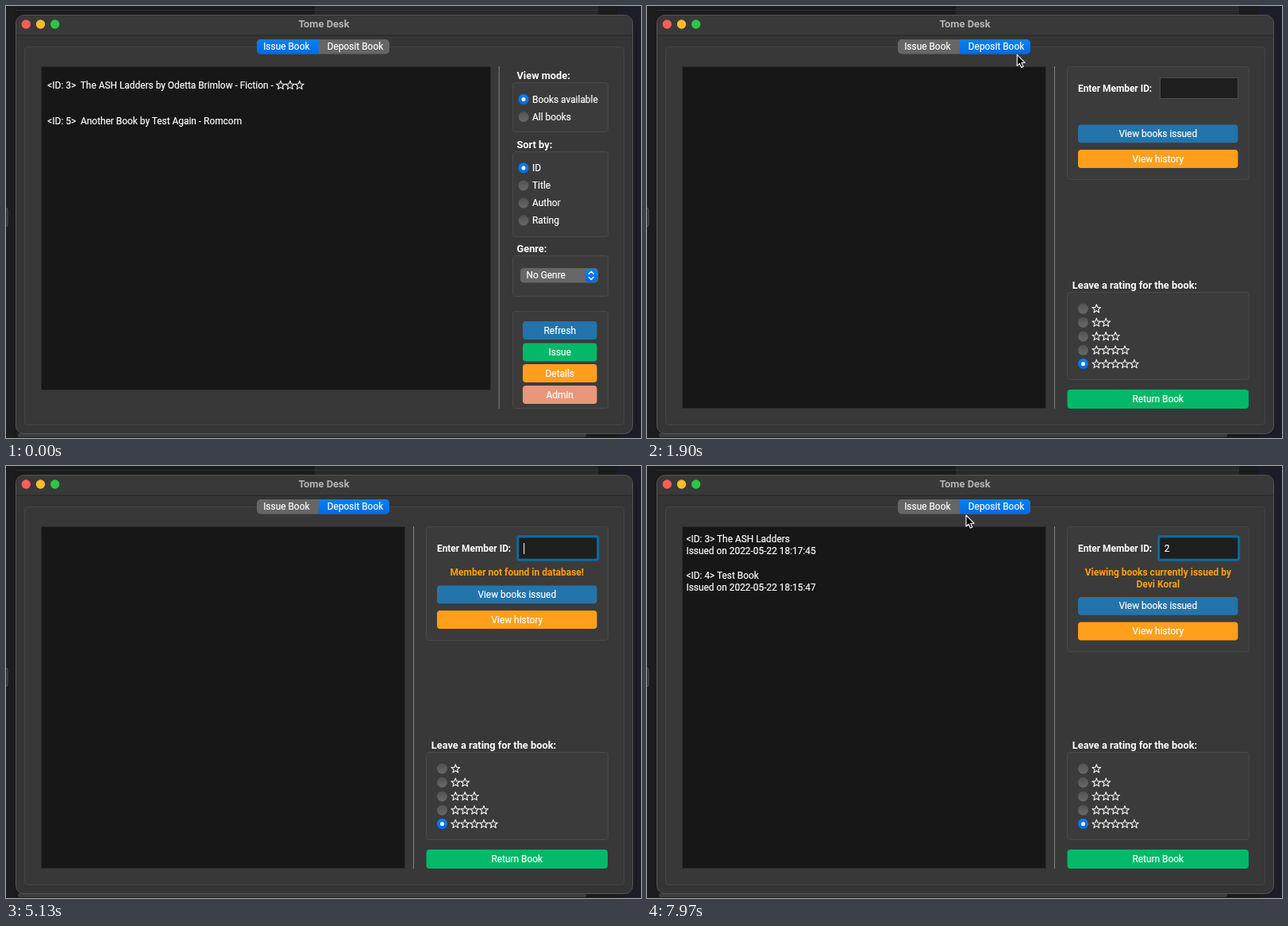
Write an HTML page that moves like this. It is 800 by 544 pixels and loops after 8 s.

```html
<!DOCTYPE html>
<html lang="en">
<head>
<meta charset="utf-8">
<title>Tome Desk</title>
<style>
html, body { margin: 0; width: 100%; height: 100%; overflow: hidden; background: #1a1a1c; }
svg { display: block; width: 800px; height: 544px; }
text { font: 400 11.9px Roboto, sans-serif; fill: #fff; stroke: #fff; stroke-width: .2px; white-space: pre; }
.bold { font-weight: 700; stroke: none; }
.head { font-size: 12.8px; }
.title { font-size: 12.9px; fill: #b4b4b4; }
.note { font-size: 12px; fill: #ff9f0f; }
.mid { text-anchor: middle; }
.frame { fill: #3b3b3b; stroke: #484848; }
.star { fill: none; stroke: #f4f4f4; stroke-width: 1.1px; stroke-linejoin: round; }
</style>
</head>
<body>
<svg id="stage" viewBox="0 0 800 544" xmlns="http://www.w3.org/2000/svg"></svg>
<script>
const BLUE = '#2374ab', GREEN = '#03b868', AMBER = '#ff9f1c', SALMON = '#e9967a';
const LOOP = 8000;

const rect = (x, y, w, h, fill, r = 0, more = '') =>
  `<rect x="${x}" y="${y}" width="${w}" height="${h}" rx="${r}" fill="${fill}" ${more}/>`;
const frame = (x, y, w, h, id = '') =>
  `<rect class="frame" x="${x + .5}" y="${y + .5}" width="${w}" height="${h}" rx="3.5" ${id && `id="${id}"`}/>`;
const text = (x, y, s, cls = '', id = '') =>
  `<text x="${x}" y="${y}" class="${cls}" ${id && `id="${id}"`}>${s.replace(/</g, '&lt;').replace(/>/g, '&gt;')}</text>`;
const button = (x, y, w, h, fill, s) =>
  rect(x, y, w, h, fill, 4) + text(x + w / 2, y + h / 2 + 4, s, 'mid');
const radio = (x, y, on) => on
  ? `<circle cx="${x}" cy="${y}" r="6.6" fill="url(#blue)"/><circle cx="${x}" cy="${y}" r="2.5" fill="#fff"/>`
  : `<circle cx="${x}" cy="${y}" r="6.5" fill="url(#grey)"/>`;
const option = (y, s, on) => radio(652, y, on) + text(663, y + 4.3, s);

function star(cx, cy) {
  const points = Array.from({ length: 10 }, (_, i) => {
    const a = Math.PI * (i / 5 - .5), r = i % 2 ? 2.4 : 5.7;
    return (cx + r * Math.cos(a)).toFixed(2) + ',' + (cy + r * Math.sin(a)).toFixed(2);
  });
  return `<polygon class="star" points="${points.join(' ')}"/>`;
}
const stars = (n, x, y) => Array.from({ length: n }, (_, i) => star(x + i * 11.9, y)).join('');

const defs = `<defs>
  <linearGradient id="blue" x2="0" y2="1"><stop stop-color="#0a80f5"/><stop offset="1" stop-color="#006ae0"/></linearGradient>
  <linearGradient id="grey" x2="0" y2="1"><stop stop-color="#525252"/><stop offset="1" stop-color="#696969"/></linearGradient>
</defs>`;

const desktop =
  rect(0, 0, 800, 544, '#1b1b1c') +
  rect(389, 0, 357, 11, '#282829') + rect(12, 5, 377, 1, '#303031') + rect(389, 5, 357, 1, '#363637') +
  rect(770, 0, 30, 544, '#1c1d28') + rect(0, 0, 11, 544, '#1d1d1e') +
  rect(-4, 254, 6, 24, '#2c2c2d', 3, 'stroke="#555"') +
  rect(15, 538, 716, 5, '#3d3d3e', 2);

const win =
  rect(12.5, 11.5, 777, 527, '#353535', 10, 'stroke="#565656"') +
  `<path d="M13 37V22a10 10 0 0 1 10-10H779a10 10 0 0 1 10 10V37Z" fill="#393939"/>` +
  rect(13, 36.5, 776, 1, '#242424') +
  ['#fe5f57', '#febc2e', '#28c840'].map((c, i) =>
    `<circle cx="${25.3 + i * 18.2}" cy="23" r="5.7" fill="${c}"/>`).join('') +
  text(400.5, 27, 'Tome Desk', 'bold title mid') +
  rect(23.5, 51.5, 755, 476, '#383838', 4, 'stroke="#454545"');

const tabs =
  rect(316, 42, 167, 18.5, '#666', 5) +
  `<path id="tabOn" fill="url(#blue)"/>` +
  text(353.3, 55.3, 'Issue Book', 'mid') + text(440, 55.3, 'Deposit Book', 'mid');

const issuePage = `<g id="issue">` +
  rect(44.5, 76.5, 566, 407, '#171717', 0, 'stroke="#2b2b2b"') +
  text(52.3, 104.3, '<ID: 3>  The ASH Ladders by Odetta Brimlow - Fiction -') + stars(3, 346, 100) +
  text(52.3, 149.3, '<ID: 5>  Another Book by Test Again - Romcom') +
  rect(620.7, 76, 1, 431, '#858585') +
  text(643.5, 91.5, 'View mode:', 'bold head') + frame(638, 96, 120, 62) +
  option(117.5, 'Books available', true) + option(139.5, 'All books') +
  text(643.5, 178.5, 'Sort by:', 'bold head') + frame(638, 183, 120, 107) +
  ['ID', 'Title', 'Author', 'Rating'].map((s, i) => option(204 + i * 22, s, !i)).join('') +
  text(643.5, 309.5, 'Genre:', 'bold head') + frame(638, 314, 120, 51) +
  rect(648, 330, 98, 18.5, '#676767', 4.5) + rect(729.5, 331, 15.5, 16.5, 'url(#blue)', 4) +
  `<path d="M734.4 337.2l2.9-3 2.9 3M734.4 341.4l2.9 3 2.9-3" fill="none" stroke="#fff" stroke-width="1.4" stroke-linecap="round"/>` +
  text(655.5, 343.4, 'No Genre') + frame(638, 384, 120, 122) +
  button(651, 397, 93.5, 23, BLUE, 'Refresh') + button(651, 424.5, 93.5, 23, GREEN, 'Issue') +
  button(651, 451, 93.5, 23, AMBER, 'Details') + button(651, 478, 93.5, 23, SALMON, 'Admin') +
  `</g>`;

const depositPage = `<g id="deposit">` +
  rect(44.5, 76.5, 458, 430, '#171717', 0, 'stroke="#2b2b2b"') +
  `<g id="loans">` +
  text(49.5, 96.3, '<ID: 3> The ASH Ladders') + text(49.5, 111, 'Issued on 2022-05-22 18:17:45') +
  text(49.5, 142.3, '<ID: 4> Test Book') + text(49.5, 157, 'Issued on 2022-05-22 18:15:47') +
  `</g>` +
  rect(513, 76, 1, 431, '#858585') +
  frame(529, 76, 229, 142, 'panel') +
  text(543, 107.8, 'Enter Member ID:', 'bold') +
  rect(646.5, 90.5, 98, 26, '#1e1e1e', 0, 'stroke="#4c4c4c"') +
  rect(644.7, 88.7, 101, 29.6, '#1e1e1e', 2, 'stroke="#0b6c9d" stroke-width="3" id="ring"') +
  text(651.8, 108.2, '', '', 'entry') + rect(0, 97, 1.2, 14, '#ddd', 0, 'id="caret"') +
  text(643.8, 138, '', 'bold note mid', 'note1') + text(643.8, 152.5, '', 'bold note mid', 'note2') +
  `<g id="actions">` + button(543, 149.5, 201.5, 22.8, BLUE, 'View books issued') +
  rect(543.5, 150, 200.5, 21.8, 'none', 4, 'stroke="#117c78" id="glow"') +
  button(543, 181, 201.5, 23, AMBER, 'View history') + `</g>` +
  text(535.8, 355.7, 'Leave a rating for the book:', 'bold head') + frame(529, 360, 229, 110) +
  [1, 2, 3, 4, 5].map(n => radio(549.5, 363.7 + n * 17.4, n === 5) + stars(n, 566.3, 364 + n * 17.4)).join('') +
  button(529.5, 483, 228.5, 24, GREEN, 'Return Book') +
  `</g>`;

const pointer =
  `<path id="arrow" d="M0 0V14L3.2 11.1 5.4 16 7.8 15 5.7 10.2H10.1Z" fill="#000" stroke="#fff" stroke-width="1.1" stroke-linejoin="round"/>` +
  `<g id="beam" fill="none"><path id="bar" d="M-3-7Q0-7 0-5Q0-7 3-7M0-5V5M-3 7Q0 7 0 5Q0 7 3 7M-2 2H2" stroke="#fff" stroke-width="2.6"/>` +
  `<path d="M-3-7Q0-7 0-5Q0-7 3-7M0-5V5M-3 7Q0 7 0 5Q0 7 3 7M-2 2H2" stroke="#222" stroke-width="1"/></g>`;

document.getElementById('stage').innerHTML =
  defs + desktop + win + tabs + issuePage + depositPage + pointer;

const $ = id => document.getElementById(id);
const show = (id, on) => $(id).setAttribute('visibility', on ? 'inherit' : 'hidden');
const within = (v, a, b) => v >= a && v < b;

// Pointer stops: time, x, y
const path = [
  [30, 452, 546], [600, 436, 473], [870, 436, 473], [1400, 427.5, 52.5], [1750, 427.5, 52.5],
  [2370, 687.5, 112], [3150, 687.5, 112], [3600, 658.5, 158.5], [4070, 658.5, 158.5],
  [4570, 689, 113], [5530, 689, 113], [6100, 646.5, 158.5], [6870, 646.5, 158.5],
  [7000, 649, 164], [7670, 649, 164], [7970, 402, 62]
];
// Caret on and off times, alternating
const blinks = [2470, 2730, 2970, 3570, 4070, 4570, 4730, 5230, 5530, 6130, 6500, 7000, 7400, 7970];

function pointerAt(t) {
  const i = path.findIndex(p => p[0] > t);
  if (i < 1) return (i ? path[path.length - 1] : path[0]).slice(1);
  const [t0, x0, y0] = path[i - 1], [t1, x1, y1] = path[i];
  const u = (t - t0) / (t1 - t0), e = u * u * (3 - 2 * u);
  return [x0 + (x1 - x0) * e, y0 + (y1 - y0) * e];
}

function render(t) {
  const deposit = t >= 1630, found = t >= 6330, missing = t >= 3730 && !found;
  show('issue', !deposit);
  show('deposit', deposit);
  $('tabOn').setAttribute('d', deposit
    ? 'M394 42H478a5 5 0 0 1 5 5V55.5a5 5 0 0 1-5 5H394Z'
    : 'M394 42H321a5 5 0 0 0-5 5V55.5a5 5 0 0 0 5 5H394Z');

  const entry = t < 2970 ? '' : t < 5130 ? '1' : t < 5230 ? '' : '2';
  $('entry').textContent = entry;
  $('caret').setAttribute('x', entry ? 658 : 652);
  show('caret', deposit && blinks.filter(b => b <= t).length % 2 === 1);
  show('ring', deposit && t >= 2470);

  const shift = found ? 15.5 : missing ? 1 : 0;
  $('actions').setAttribute('transform', `translate(0 ${shift})`);
  $('panel').setAttribute('height', 142 + shift);
  $('note1').textContent = found ? 'Viewing books currently issued by' : missing ? 'Member not found in database!' : '';
  $('note2').textContent = found ? 'Devi Koral' : '';
  show('loans', deposit && found);

  const [x, y] = pointerAt(t);
  const hidden = t < 30 || within(t, 2970, 3150) || within(t, 5130, 5530);
  const beam = deposit && within(x, 645, 747) && within(y, 88, 120);
  show('glow', deposit && within(x, 543, 745) && within(y, 150, 188));
  show('arrow', !hidden && !beam);
  show('beam', !hidden && beam);
  for (const id of ['arrow', 'beam'])
    $(id).setAttribute('transform', `translate(${x.toFixed(2)} ${y.toFixed(2)})`);
}

const start = performance.now();
function tick() {
  render((performance.now() - start) % LOOP);
  requestAnimationFrame(tick);
}
tick();
</script>
</body>
</html>
```
